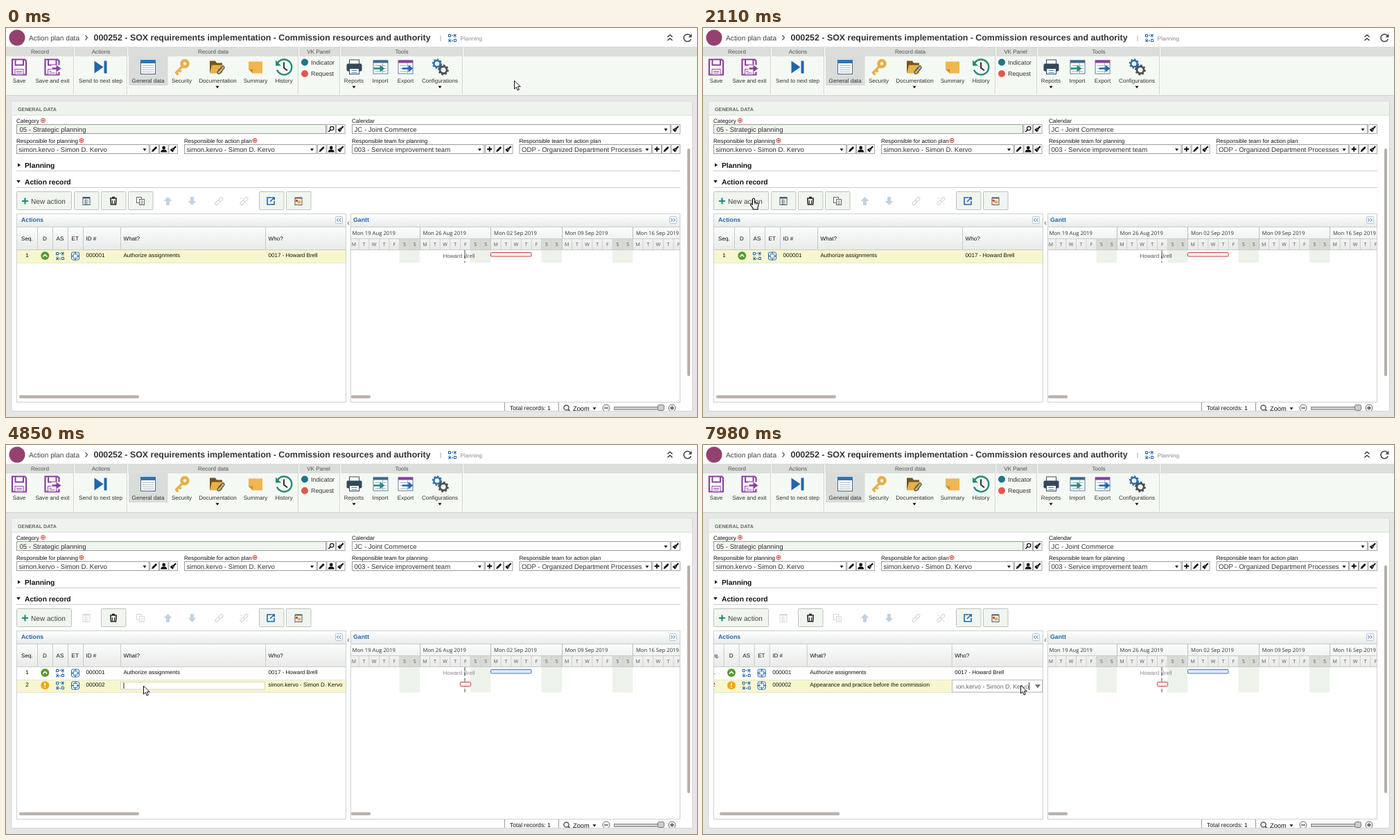
These frames come from a looping animation (997 by 562 pixels, 8 s). An HTML page:

```html
<!DOCTYPE html>
<html lang="en">
<head>
<meta charset="utf-8">
<title>Action plan data</title>
<style>
html,body{margin:0;width:100%;height:100%;overflow:hidden;background:#e6e6e6}
svg{display:block;width:997px;height:562px}
text{font-family:"Liberation Sans",Arial,sans-serif;white-space:pre;text-rendering:geometricPrecision}
.g{font-family:"Open Sans","Noto Sans",sans-serif}
</style>
</head>
<body>
<svg id="stage" viewBox="0 0 997 562" xmlns="http://www.w3.org/2000/svg"></svg>
<script>
const OWNER = 'simon.kervo - Simon D. Kervo', HELPER = 'Howard Brell';
const TYPED = 'Appearance and practice before the commission';
const BLUE = '#2067ad', INK = '#111', GOLD = '#e8b04a', PURPLE = '#8b3f9e', TEAL = '#258a77';

// Markup helpers
const rect = (x, y, w, h, fill, stroke = 'none', r = 0) =>
  `<rect x="${x}" y="${y}" width="${w}" height="${h}" rx="${r}" fill="${fill}" stroke="${stroke}"/>`;
const path = (d, stroke, w = 1, fill = 'none') =>
  `<path d="${d}" stroke="${stroke}" stroke-width="${w}" fill="${fill}"/>`;
const fillPath = (d, fill) => path(d, 'none', 0, fill);
const circle = (x, y, r, fill, stroke = 'none', w = 1) =>
  `<circle cx="${x}" cy="${y}" r="${r}" fill="${fill}" stroke="${stroke}" stroke-width="${w}"/>`;
const text = (x, y, s, size = 8.1, fill = INK, extra = '') =>
  `<text x="${x}" y="${y}" font-size="${size}" fill="${fill}" ${extra}>${s}</text>`;
const MID = 'text-anchor="middle"', BOLD = 'font-weight="bold"';
const at = (x, y, s, extra = '') => `<g transform="translate(${x} ${y})" ${extra}>${s}</g>`;
const group = (id, s) => `<g id="${id}">${s}</g>`;
const vline = (x, y1, y2, c) => path(`M${x} ${y1}V${y2}`, c);
const hline = (y, x1, x2, c) => path(`M${x1} ${y}H${x2}`, c);
const down = (x, y, c = INK, s = 2.5) => fillPath(`M${x - s} ${y - s / 2}h${2 * s}l${-s} ${s * 1.4}z`, c);

// Small icons, each centred on the origin
const flow = rect(-5.5, -5, 3, 3, '#fff', BLUE) + rect(2.5, 2, 3, 3, '#fff', BLUE)
  + path('M2-5.500L5.500-2M5.500-5.500L2-2M-5.500 2L-2 5.500M-2 2L-5.500 5.500', BLUE, 1.2)
  + path('M-1-4H1M-4 0V1M4-1V0M-1 4H1', BLUE, 1.2);
const target = rect(-5.5, -5.5, 11, 11, '#fff', BLUE, 2) + path('M0-6V-2M0 2V6M-6 0H-2M2 0H6', BLUE, 1.3)
  + path('M-3-1V-3H-1M1-3H3V-1M3 1V3H1M-1 3H-3V1', BLUE, .8);
const upDot = circle(0, 0, 6, '#579b32') + path('M-3 1.500L0-1.500L3 1.500', '#fff', 1.6);
const warnDot = circle(0, 0, 6, '#f1a51c') + path('M0-3.500V1M0 2.300v1.500', '#fff', 1.6);
const glyphs = {
  brush: path('M4-4L0 0', INK, 2.2) + fillPath('M-1-2L2 1L-1 4.500L-4.500 1z', INK) + path('M-2-1L1 2', '#fff', .7),
  pencil: path('M3-3L-2.500 2.500', INK, 2.6) + fillPath('M-4 4l.6-2.600l2 2z', INK),
  person: circle(0, -2, 2.4, INK) + fillPath('M-4.500 4.500q0-4 4.500-4t4.500 4z', INK),
  plus: path('M0-3.500V3.500M-3.500 0H3.500', INK, 2),
  search: circle(1, -1, 2.7, 'none', INK, 1.2) + path('M-1 1L-4 4', INK, 1.7)
};
const floppy = path('M-10-11H8L10-9V11H-10z', PURPLE, 2.2, '#fff') + path('M-5.500-11V-3H6V-11', PURPLE, 2)
  + rect(-6, 3, 12, 8, '#fff', PURPLE) + path('M-4 6H4M-4 8.500H4', PURPLE, 1);
const gear = (x, y, r, c) => circle(x, y, r, 'none', c, r * .55)
  + `<circle cx="${x}" cy="${y}" r="${r * 1.35}" fill="none" stroke="${c}" stroke-width="${r * .45}" pathLength="16" stroke-dasharray="1 1"/>`;
const windowIcon = side => rect(-10.5, -9.5, 21, 19, '#fff', '#5d7f9c') + rect(-10.5, -10, 21, 4, side)
  + path('M-8-2H8M-8 2H8M-8 6H8M3-6V9', '#9db3c4', 1);
const arrowRight = (c, tail = 10) => path(`M${-tail} 2H0`, c, 2.6) + fillPath('M-1-3L6 2L-1 7z', c);

const ribbonIcons = [
  [19, floppy],
  [66.5, floppy + rect(-1, -3, 15, 10, '#f5f9f3') + at(7, 0, arrowRight(PURPLE, 7))],
  [136.5, fillPath('M-9-9L4 0L-9 9z', BLUE) + rect(5, -9, 4, 18, BLUE)],
  [205, rect(-10.5, -10, 21, 20, '#fff', '#47677f') + rect(-11, -10.5, 22, 5, '#2b76b4')
    + path('M-8-2H8M-8 1H8M-8 4H8M-8 7H8', '#aab6bd', 1)],
  [253.5, circle(4.5, -5, 4.5, 'none', GOLD, 4.5) + path('M1-1L-9 9M-8 8l3 3M-4 4l3 3', GOLD, 3.4)],
  [305, fillPath('M-11-9h8l2 3h8V8H-11z', '#73541e') + fillPath('M-8-3H10L6 9H-11z', GOLD)
    + path('M1 5L7-1q3-1 3 2L4 9q-4 2-4-2L6 1', '#4d6577', 1.5)],
  [360, fillPath('M-10-8H10V9H-4L-10 3z', '#f0b650') + fillPath('M-4 9V3H-10z', '#d28d24')],
  [401, path('M-9-6A11 11 0 1 1-10 4', TEAL, 2.4) + fillPath('M-12-10V-2H-4z', TEAL) + path('M0-7V1L5 5', '#333', 2)],
  [502.5, rect(-7, -10.5, 14, 8, '#fff', '#33495b') + rect(-11, -5, 22, 11, '#33495b', 'none', 2)
    + rect(-7, 2, 14, 8, '#fff', '#33495b') + path('M-4 5H4M-4 8H4', '#4d85b3', 1)],
  [540.5, windowIcon('#3b6a8f') + arrowRight(TEAL)],
  [576.5, windowIcon(PURPLE) + at(5, 0, arrowRight(BLUE))],
  [626, gear(-4, -5, 4.6, '#2d70b3') + gear(5, 4, 5, '#4b5052')]
].map(([x, s]) => at(x, 56.5, s)).join('');

function ribbon() {
  let s = rect(0, 0, 997, 27, '#fff') + rect(0, 27, 997, 14, '#dcdedb') + rect(0, 41, 997, 56, '#f5f9f3');
  s += hline(97.5, 0, 997, '#cfd1cf') + rect(177, 41, 56.5, 42, '#d9dcd9');
  s += circle(16, 14, 11.5, '#95416f');
  s += text(33, 18, 'Action plan data', 10.2, '#444') + path('M114.500 10.500L117.500 14L114.500 17.500', '#555', 1.2);
  s += text(126.5, 18, '000252 - SOX requirements implementation - Commission resources and authority', 12.42, '#333', BOLD);
  s += vline(627, 11, 19, '#aaa') + at(644, 14.5, flow) + text(655.5, 17.5, 'Planning', 8.1, '#888');
  s += path('M954.500 13L958 10L961.500 13M954.500 18L958 15L961.500 18', '#333', 1.4);
  s += path('M987.500 11A5.300 5.300 0 1 0 988.300 16', '#444', 1.5) + fillPath('M989.500 8.500V13.500H984.500z', '#444');
  for (const x of [97.5, 174.5, 421.5, 481.5, 658.5]) s += vline(x, 28, 96, '#d0d3cf') + vline(x + 1, 28, 96, '#fff');
  for (const [x, name] of [[49, 'Record'], [137, 'Actions'], [299, 'Record data'], [451, 'VK Panel'], [571, 'Tools']])
    s += text(x, 37, name, 8.1, '#555', MID);
  const items = [[19, 'Save'], [67, 'Save and exit'], [136.5, 'Send to next step'], [205, 'General data'], [253.5, 'Security'],
    [305.5, 'Documentation'], [360, 'Summary'], [401, 'History'], [502, 'Reports'], [540, 'Import'], [576.5, 'Export'], [626, 'Configurations']];
  for (const [x, name] of items) s += text(x, 78.5, name, 8.1, '#333', MID);
  for (const x of [305, 502, 626]) s += down(x, 85);
  s += circle(431, 49.5, 5, '#21758a') + circle(431, 66, 5, '#e4574b');
  s += text(440, 52.5, 'Indicator', 8.9, '#333') + text(440, 69, 'Request', 8.9, '#333');
  return s + ribbonIcons;
}

function field(x, y, right, label, value, icons, opt = {}) {
  const boxes = icons.map((k, i) => {
    const bx = right - 13.5 * (icons.length - i) + .5;
    return rect(bx, y, 12.5, 13, '#fff', '#a5a8a5') + at(bx + 6.2, y + 6.5, glyphs[k]);
  }).join('');
  const end = right - 13.5 * icons.length - 1;
  let s = text(x - .5, y - 2.5, label) + rect(x, y, end - x, 13, opt.fill || '#fff', '#9a9d9a') + boxes;
  if (opt.star) s += circle(opt.star, y - 6, 3, '#fff', '#d43d35', 1) + path(`M${opt.star - 2} ${y - 6}h4m-2-2v4`, '#d43d35', 1);
  s += at(x, y, text(opt.pad || 3, 10, value, 9.6, '#333'), opt.clip ? 'clip-path="url(#teamClip)"' : '');
  return s + (opt.plain ? '' : down(end - 6.5, y + 7));
}

function form() {
  let s = rect(8, 106, 982.5, 447.5, '#fff', '#d5d7d4') + rect(8.5, 106.5, 981.5, 19.5, '#eff3ed') + hline(126, 8, 990, '#dadcd9');
  s += text(17, 119.5, 'GENERAL DATA', 7.2, '#666', BOLD);
  const edit = ['pencil', 'person', 'brush'], team = ['plus', 'pencil', 'brush'];
  s += field(15.5, 139.5, 489.5, 'Category', '05 - Strategic planning', ['search', 'brush'], {star: 53.5, fill: '#f1f5ef', plain: 1, pad: 4});
  s += field(499.5, 139.5, 973, 'Calendar', 'JC - Joint Commerce', ['brush']);
  s += field(15.5, 168.5, 248, 'Responsible for planning', OWNER, edit, {star: 109});
  s += field(257.5, 168.5, 489.5, 'Responsible for action plan', OWNER, edit, {star: 359});
  s += field(499.5, 168.5, 731.5, 'Responsible team for planning', '003 - Service improvement team', team);
  s += field(741, 168.5, 973, 'Responsible team for action plan', 'ODP - Organized Department Processes Team', team, {clip: 1});
  s += fillPath('M17 195.200L21 198L17 200.800z', INK) + text(27, 201.5, 'Planning', 10.25, INK, BOLD) + hline(206.5, 15, 973, '#c9c9d4');
  s += down(18, 221.5, INK, 2.8) + text(27, 225.5, 'Action record', 10.25, INK, BOLD) + hline(230.5, 15, 973, '#c9c9d4');
  return s + rect(983, 174, 4, 329, '#b5afa9', 'none', 2);
}

const button = (x, w) => rect(x + .5, 236.5, w, 26, '#f1f5ef', '#bcc3bd', 1);
const sheet = c => rect(-5, -5.5, 10, 11, '#fff', c) + path('M-5-4.500H5', c, 2) + path('M-3-1H3M-3 1.500H3M-3 4H3M-1-3V5', c, .8);
const copies = c => rect(-5.5, -5.5, 7, 8, '#fff', c) + rect(-1.5, -2.5, 7, 8, '#fff', c) + path('M0 0h4M0 2h4M0 4h4', c, .8);
function toolbar() {
  const pale = '#c3d2df', grey = '#d5d8da';
  let s = button(15, 79) + path('M27.500 245.500V254.500M23 250H32', TEAL, 2.2) + text(36, 254, 'New action', 10.1, '#444');
  s += group('wideTools', button(98, 35.5) + at(116, 250, sheet('#44596a')) + button(176, 35.5) + at(194, 250, copies('#666')));
  s += group('paleTools', at(116, 250, sheet(grey)) + at(194, 250, copies(grey)));
  s += button(137, 35.5) + at(155, 250, path('M-5-4H5M-2-5.500H2M-4-3L-3.500 5H3.500L4-3', '#222', 1.6) + path('M-1.500-1V4M1.500-1V4', '#222', 1));
  const arrow = 'M0-6L6 0H2.500V6H-2.500V0H-6z';
  s += at(233.5, 250, fillPath(arrow, pale)) + at(268.5, 250, `<g transform="scale(1 -1)">${fillPath(arrow, pale)}</g>`);
  const chain = rect(-7, -2, 7, 4, 'none', '#cdd0d2', 2) + rect(0, -2, 7, 4, 'none', '#cdd0d2', 2);
  s += at(307.5, 250, `<g transform="rotate(-45)">${chain}</g>`);
  s += at(343.5, 250, `<g transform="rotate(-45)">${chain}</g>` + path('M-5-5l2 2M3 3l2 2', '#cdd0d2', 1));
  s += button(365, 35.5) + at(382, 250, path('M1-5H-5V5H5V0', BLUE, 1.6) + path('M-1 1L5-5M1.500-5H5.200V-1.500', BLUE, 1.6));
  s += button(404, 35.5) + at(422, 250, rect(-5, -4.5, 10, 10, '#fff', '#555') + path('M-5-4.500H5', '#555', 2)
    + circle(1, 1.5, 2.5, GOLD) + rect(-4, -2, 3, 3, '#c94d45'));
  return s;
}

function tables() {
  let s = '';
  for (const [x, title] of [[15.5, 'Actions'], [497.5, 'Gantt']])
    s += rect(x, 268.5, 475, 272, '#fff', '#cdd0d0') + rect(x + .5, 269, 474, 18, 'url(#bar)')
      + hline(287.5, x, x + 475, '#c6ccd2') + text(x + (x < 99 ? 6.5 : 3.5), 280.3, title, 8.75, BLUE, BOLD);
  for (const [x, d] of [[480.5, -1], [962.5, 1]])
    s += rect(x - 5, 272.5, 10, 10, '#f4f8fb', '#b7c8d8', 1)
      + path([-2, 1.5].map(o => `M${x + o - d} 275.300l${2 * d} 2.200l${-2 * d} 2.200`).join(''), BLUE, 1);
  s += path('M495 279.500l-2 2.500l2 2.500', '#555', 1) + rect(16, 288, 474, 32, 'url(#head)') + hline(320.5, 16, 490, '#c9cbc8');
  s += group('pick', rect(16, 321, 474, 18, '#f8f6cd')) + hline(339.5, 16, 490, '#e4e4dc');
  s += group('rowLine', hline(357.5, 16, 490, '#e4e4dc'));
  let cells = '';
  for (const x of [45.5, 67.5, 89.5, 111.5, 165.5, 374.5]) cells += vline(x, 288, 320, '#c9cbc8');
  for (const [x, name] of [[22, 'Seq.'], [53, 'D'], [72.5, 'AS'], [94.5, 'ET'], [115.5, 'ID #'], [169.5, 'What?'], [378.5, 'Who?']])
    cells += text(x, 306.5, name);
  const row = (n, y, who) => text(28.3, y + 2.7, n) + at(78, y + 1.5, flow) + at(100, y + 1.5, target)
    + text(115.5, y + 2.7, '00000' + n) + text(378.5, y + 2.7, who, 8.05);
  cells += row(1, 328, '0017 - ' + HELPER) + at(56.3, 329, upDot) + text(169.5, 330.7, 'Authorize assignments', 8.05);
  cells += group('row2', row(2, 346, OWNER) + group('warn', at(56.3, 347.3, warnDot)) + group('what', text(169.5, 348.7, TYPED, 8.05)));
  s += `<g clip-path="url(#leftClip)"><g id="cells">${cells}</g></g>`;
  s += group('edit', rect(165.5, 342.5, 208, 10.5, '#fff', '#d6d4bd') + `<text id="typed" x="169.500" y="350.600" font-size="8.050" fill="#333"></text>`
    + `<path id="caret" d="M0 343.500V352" stroke="#222"/>`);
  s += group('combo', rect(359.5, 339.5, 130, 17.5, '#fff', '#b9bbb9')
    + `<g clip-path="url(#comboClip)">${text(470, 352, OWNER, 8.75, '#666', 'text-anchor="end"')}</g>`
    + vline(470.5, 343, 354, '#333') + down(483, 348, '#777', 4));
  s += group('thumb', rect(19, 530.5, 173, 4.5, '#bab3ac', 'none', 2)) + rect(498, 530.5, 28, 4.5, '#bab3ac', 'none', 2);
  return s;
}

function gantt() {
  const day = 14.64, first = 494.5;
  let s = rect(498, 288, 474, 32, 'url(#head)');
  ['19 Aug', '26 Aug', '02 Sep', '09 Sep', '16 Sep'].forEach((d, w) => {
    const x = first + w * 7 * day;
    s += rect(x + 5 * day, 304, 2 * day, 16, '#d7dad5');
    s += `<rect class="weekend" x="${x + 5 * day}" y="321" width="${2 * day}" height="18" fill="#edf2ea"/>`;
    if (w) s += vline(Math.round(x) + .5, 288, 320, '#bbbdbb');
    s += text(w ? x + 4.5 : 499.5, 298.5, `Mon ${d} 2019`, 7.7, '#333', 'class="g"');
    [...'MTWTFSS'].forEach((c, i) => {
      s += text(x + (i + .5) * day, 315, c, 7, '#555', 'class="g" ' + MID) + vline(x + i * day, 304, 320, '#cfd1ce');
    });
  });
  s += hline(304.5, 498, 972, '#c9cbc8') + hline(320.5, 498, 972, '#c9cbc8');
  s += `<text id="label" x="630.500" y="331.700" font-size="8.050">${HELPER}</text>`;
  s += '<path id="today" stroke="#444" stroke-dasharray="5 2.800"/>';
  s += '<rect id="task" x="699.500" y="324.500" width="58.500" height="5.500" rx="1"/>';
  s += group('task2', rect(655.5, 342.5, 15, 6, '#fff0ee', '#c6423f', 1));
  return `<g clip-path="url(#rightClip)">${s}</g>`;
}

function footer() {
  let s = vline(719.5, 541, 553, '#999') + vline(797.5, 541, 553, '#999') + text(727, 552.2, 'Total records: 1', 8.6);
  s += circle(808.5, 548.5, 3.6, '#fff', '#555', 1.5) + path('M811 551L814 554', '#555', 2) + text(818, 552.5, 'Zoom', 9.3) + down(849, 549.5);
  s += circle(866, 549, 5, '#fff', '#666') + path('M863 549H869', '#444', 1.3);
  s += rect(877.5, 547.5, 66, 4, '#c9cbcc', '#888') + rect(940.5, 544.5, 9, 8, '#ccc', '#777', 2);
  s += circle(961, 549, 5, '#fff', '#666') + path('M958 549H964M961 546V552', '#444', 1.3);
  return `<g clip-path="url(#footClip)">${s}</g>`;
}

const clip = (id, x, y, w, h) => `<clipPath id="${id}">${rect(x, y, w, h, '#000')}</clipPath>`;
const grad = (id, a, b) => `<linearGradient id="${id}" x2="0" y2="1"><stop stop-color="${a}"/><stop offset="1" stop-color="${b}"/></linearGradient>`;
const pointers = group('arrow', path('M0 0V12L2.800 9.400L4.700 14L6.800 13.100L4.900 8.700H8.700z', '#111', 1, '#fff'))
  + group('hand', path('M-1.500 8V1Q0-1 1.500 1V6L6 7Q7.500 7.500 7 10L6 13V16H-1V14L-4.500 9.500Q-4 7-1.500 9z', '#111', 1.1, '#fff') + path('M2 6V9M4.300 7V9', '#111', .8))
  + group('beam', path('M-2-6H-.5L0-5.500L.5-6H2M0-5.500V5.500M-2 6H-.5L0 5.500L.5 6H2', '#222', 1.1));

const stage = document.getElementById('stage');
stage.innerHTML = '<defs>' + grad('bar', '#fff', '#e7ece9') + grad('head', '#fbfcfb', '#e8ebe7')
  + clip('teamClip', 0, 0, 177, 13) + clip('leftClip', 16, 269, 474, 270) + clip('rightClip', 498, 287, 474, 240)
  + clip('comboClip', 365, 340, 112, 17) + clip('footClip', 500, 540, 480, 13) + '</defs>'
  + rect(0, 0, 997, 562, '#e6e6e6') + ribbon() + form() + toolbar() + tables() + gantt() + footer() + group('pointer', pointers);

const el = {};
stage.querySelectorAll('[id]').forEach(n => el[n.id] = n);
const show = (id, on) => el[id].setAttribute('display', on ? 'inline' : 'none');
const weekends = stage.querySelectorAll('.weekend');

// Pointer route: time, x, y
const route = [[0, 733.5, 76], [30, 733.5, 76], [580, 508.5, 262], [980, 340, 318], [1380, 178.5, 304.5], [1690, 98, 268],
  [1910, 73, 246], [2910, 73, 246], [3300, 140, 330], [3670, 197, 357], [4090, 198.5, 348], [5600, 198.5, 348],
  [5960, 226.5, 350], [6020, 227, 350], [6400, 365, 353], [6730, 458.5, 347], [8000, 458.5, 347]];

function slope(i, k) {
  const a = route[i - 1], b = route[i], c = route[i + 1];
  if (!a || !c || a[k] === b[k] || b[k] === c[k]) return 0;
  return (c[k] - a[k]) / (c[0] - a[0]);
}
function pointerAt(t) {
  const i = Math.max(1, route.findIndex(p => p[0] > t)), a = route[i - 1], b = route[i];
  const d = b[0] - a[0], u = (t - a[0]) / d, v = 1 - u;
  return [1, 2].map(k => v * v * (1 + 2 * u) * a[k] + u * v * v * d * slope(i - 1, k)
    + u * u * (3 - 2 * u) * b[k] - u * u * v * d * slope(i, k));
}

function draw(t) {
  const added = t >= 2910, editing = t >= 4320 && t < 6830, combo = t >= 7800;
  const [x, y] = pointerAt(t);
  const hand = x < 95 && y < 263, beam = editing && t >= 5600 && x < 373;
  el.pointer.setAttribute('transform', `translate(${x.toFixed(2)} ${y.toFixed(2)})`);
  show('hand', hand);
  show('beam', beam);
  show('arrow', !hand && !beam);

  for (const id of ['row2', 'rowLine', 'paleTools', 'task2']) show(id, added);
  show('wideTools', !added);
  show('warn', t >= 3400);
  el.pick.setAttribute('transform', `translate(0 ${added ? 18.5 : 0})`);
  weekends.forEach(n => n.setAttribute('height', added ? 36.5 : 18));
  el.today.setAttribute('d', `M662 321V${added ? 357.5 : 339}`);
  el.label.setAttribute('fill', added ? '#8a8a8a' : '#555');
  el.task.setAttribute('fill', added ? '#dfeaf6' : '#fff0ee');
  el.task.setAttribute('stroke', added ? '#4a78ab' : '#c6423f');

  show('edit', editing);
  show('what', t >= 6830);
  const count = Math.floor(Math.min(1, Math.max(0, (t - 5180) / 760)) * TYPED.length);
  el.typed.textContent = TYPED.slice(0, count);
  show('caret', t < 4570 || (t >= 4850 && t < 5960));
  el.caret.setAttribute('transform', `translate(${170 + (count && editing ? el.typed.getComputedTextLength() : 0)} 0)`);

  el.cells.setAttribute('transform', `translate(${combo ? -15.3 : 0} 0)`);
  el.thumb.setAttribute('transform', `translate(${combo ? 5 : 0} 0)`);
  show('combo', combo);
}

const start = performance.now();
function tick() {
  draw((performance.now() - start) % 8000);
  requestAnimationFrame(tick);
}
draw(0);
requestAnimationFrame(tick);
</script>
</body>
</html>
```
